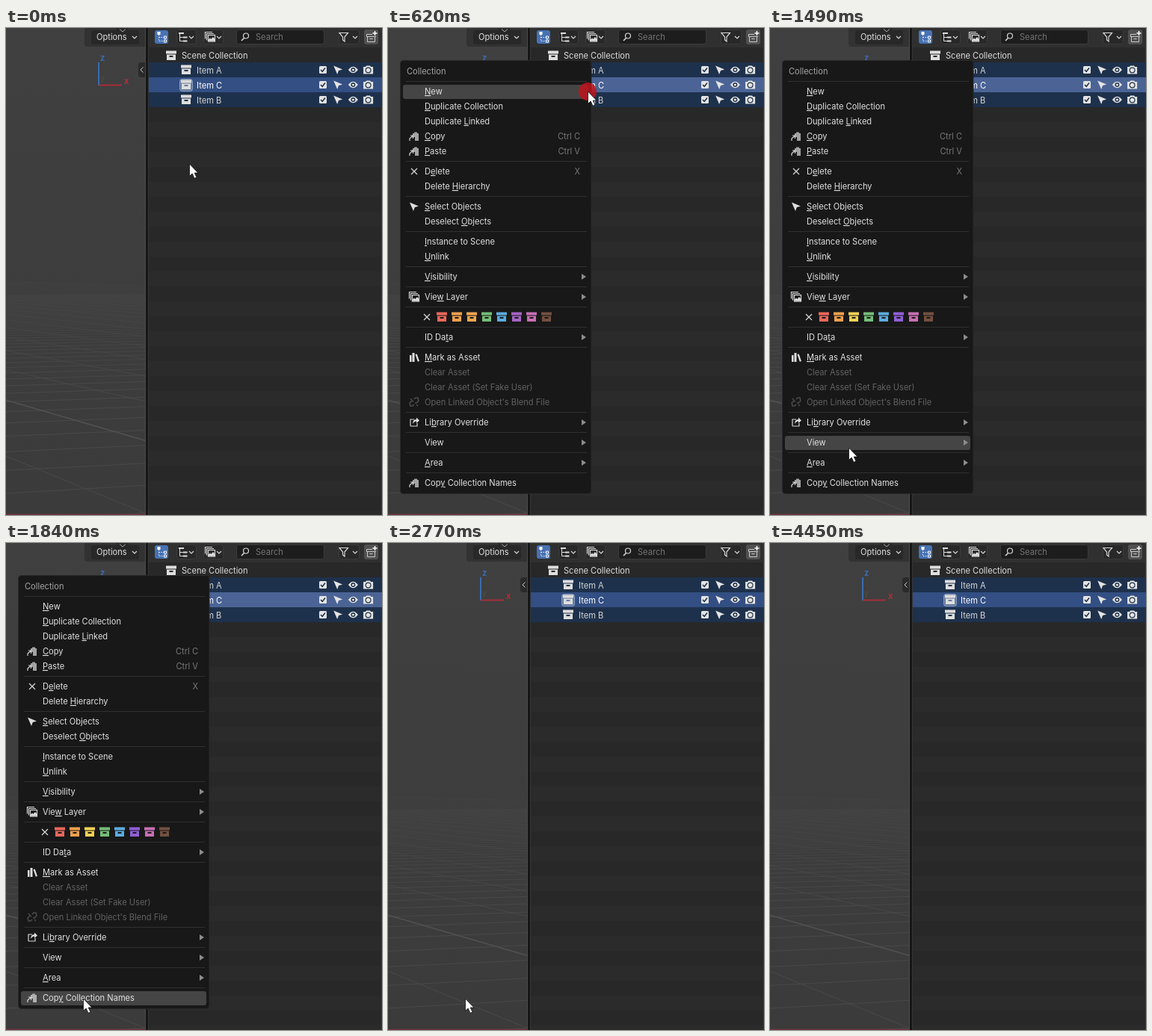
Recreate the animation shown at these times as an HTML page. Size 503 by 652 pixels, loop 5.18 s.

```html
<!DOCTYPE html>
<html lang="en">
<head>
<meta charset="utf-8">
<title>Copy collection names</title>
<style>
html, body { margin: 0; width: 100%; height: 100%; overflow: hidden; background: #161616; }
svg { display: block; width: 503px; height: 652px; }
text { font: 11.1px Inter, "Open Sans", sans-serif; fill: #dedede; white-space: pre; }
.bold { font-weight: 700; }
.u { text-decoration: underline; text-decoration-thickness: 1px; text-underline-offset: 2px; }
.line { fill: none; stroke: #d8d8d8; stroke-width: 1.2; }
.btn { fill: #282828; stroke: #3b3b3b; }
</style>
</head>
<body>
<svg id="stage" viewBox="0 0 503 652" xmlns="http://www.w3.org/2000/svg">
  <defs>
    <linearGradient id="sky" x2="0" y2="1">
      <stop offset="0" stop-color="#404040"/><stop offset="1" stop-color="#3b3b3b"/>
    </linearGradient>
    <linearGradient id="fade" gradientUnits="userSpaceOnUse" x1="0" y1="320" x2="0" y2="480">
      <stop offset="0" stop-color="#4b4b4b" stop-opacity="0"/><stop offset="1" stop-color="#4b4b4b" stop-opacity=".9"/>
    </linearGradient>
    <clipPath id="view"><rect width="186" height="652"/></clipPath>
    <g id="box"><path d="M-7-6.500h14v4h-14zM-6-1.500H6v7.500H-6zM-2.500 0v2h5v-2z" fill-rule="evenodd"/></g>
    <g id="arrow"><path d="M-6-5.500L6-.5 .8 1 -1 6z"/></g>
    <g id="eye">
      <path d="M-6.500 0Q0-8.500 6.500 0Q0 8.500-6.500 0z"/>
      <circle r="3" fill="#1d3048"/><circle r="1.600"/>
    </g>
    <g id="cam">
      <path d="M-6.500-4h3l1-1.500h5l1 1.500h3v9.500h-13z"/>
      <circle cy=".5" r="4" fill="#1d3048"/><circle cy=".5" r="2.800"/>
    </g>
    <g id="check">
      <rect x="-5" y="-5" width="10" height="10" rx="1.500"/>
      <path d="M-3 0L-.8 2.300 3-2.500" fill="none" stroke="#1d3048" stroke-width="1.500"/>
    </g>
    <g id="chev"><path d="M-3-1.500L0 1.500 3-1.500" class="line"/></g>
    <g id="image">
      <path d="M-6.500 2.500V-6.500H3M-4.500 4.500V-4.500H5" class="line" stroke-width="1"/>
      <rect x="-2.500" y="-2.500" width="9" height="8.500" class="line"/>
      <path d="M-2 5.500V3.500L0 1.500 1.500 3 4 0 6 2.500V5.500z"/>
    </g>
    <g id="clip">
      <path d="M-2-4H0V-5.500H4V-4H6V6H1V1H-2z" opacity=".7"/>
      <path d="M-6 6V3L-2-.5M-5-1H-1.500V3" class="line"/>
    </g>
    <g id="cross"><path d="M-4-4L4 4M4-4L-4 4" class="line"/></g>
    <g id="books"><path d="M-6-3h2.500v9H-6zM-2.500-6H.5V6h-3zM1.500-4l2.200-.6L7 5l-2.200.8z"/></g>
    <g id="chain" fill="none" stroke="#4c4c4c" stroke-width="1.500">
      <path d="M-1-1l-2-1-3 3 1 4 3 0 2-2M1 1l2 0 3-3-1-4-3 0-2 2M-5-5l2 2M5 5l-2-2"/>
    </g>
    <g id="over">
      <path d="M-5 5V-4H0M-5 5H4V1" class="line"/>
      <path d="M-2 2Q-2-4 3-4V-6.500L7-2.500 3 1V-1.500Q0-1.500-2 2z"/>
    </g>
  </defs>
  <g id="back"></g>
  <g id="menu">
    <rect x="16.500" y="43.500" width="255.500" height="580" rx="4" fill="#181818" stroke="#282828"/>
    <rect id="glow" x="20" width="248" height="19" rx="3" fill="#454545"/>
    <g id="items"></g>
  </g>
  <g id="tip">
    <rect x="74.500" y="628.500" width="351" height="32" rx="4" fill="#181818" stroke="#282828"/>
    <text x="84" y="645">Copy the names of the selected collections to the clipboard</text>
  </g>
  <circle id="dot" r="12"/>
  <path id="hand" d="M.5 0V16.300L4.200 13 7 19.300 10 18 7.200 12H12z" fill="#fff" stroke="#111" stroke-width=".8"/>
</svg>
<script>
const LOOP = 5180;
const $ = id => document.getElementById(id);
const rect = (x, y, w, h, fill, more = '') =>
  `<rect x="${x}" y="${y}" width="${w}" height="${h}" fill="${fill}" ${more}/>`;
const icon = (id, x, y, fill = '#dedede') => `<use href="#${id}" x="${x}" y="${y}" fill="${fill}"/>`;
const label = (x, y, s, fill = '#dedede', more = '') =>
  `<text x="${x}" y="${y + 4}" style="fill:${fill}" ${more}>${s}</text>`;
const path = (d, stroke, more = '') => `<path d="${d}" fill="none" stroke="${stroke}" ${more}/>`;
const button = (x, w) => `<rect x="${x + .5}" y="2.500" width="${w}" height="19" rx="3" class="btn"/>`;

function viewport() {
  const horizon = 317;
  let lines = '';
  for (let k = 0; k < 28; k++) {
    const y = horizon + 625 / (2.44 + k);
    lines += `M-625 ${horizon}L186 ${y + (y - horizon) * 186 / 625}`;
  }
  for (let k = -1; k < 60; k++) {
    const y = horizon + 306 * 9 / (9 + k);
    lines += `M0 ${y}L186 ${y - (y - horizon) * .035}`;
  }
  return rect(0, 0, 186, 652, 'url(#sky)')
    + '<g clip-path="url(#view)">' + path(lines, 'url(#fade)', 'stroke-width=".9"')
    + path('M0 498L186 552', '#565656')
    + '<path d="M105 0V21Q105 25 109 25H186V0z" fill="#323232"/>'
    + rect(114, 3, 64, 19, '#282828', 'rx="3"') + label(121, 12, 'Options', '#e2e2e2') + icon('chev', 172, 12.5)
    + '<path d="M147 0H164L161 6H150z" fill="#282828"/>' + path('M152 1.500L156 5 160 1.500', '#aaa')
    + path('M124 77V46', '#3a6cb0', 'stroke-width="2"') + path('M124 76.500H155', '#a82c38', 'stroke-width="2"')
    + label(126, 40, 'z', '#3a6cb0', 'class="bold"') + label(126, 67, 'y', '#4b5040')
    + label(158, 71, 'x', '#b52c3a', 'class="bold"')
    + '<path d="M187 46H181Q177 46 177 50V62Q177 66 181 66H187z" fill="#2a2a2a"/>' + path('M183.500 52.500L180 56 183.500 59.500', '#ccc')
    + rect(0, 650.5, 186, 1.5, '#6e3440') + '</g>'
    + rect(186, 0, 1, 652, '#4a4a4a') + rect(187, 0, 3, 652, '#161616') + rect(190, 0, 1, 652, '#363636');
}

function header() {
  return rect(191, 0, 312, 26, '#303030')
    + rect(199, 3, 18, 18, '#4772b3', 'rx="3"')
    + path('M204.500 9V17.500H211M204.500 12.500H211', '#e8e8e8', 'stroke-dasharray="1.500 1.500"')
    + rect(202.5, 5, 4, 4, '#fff') + path('M211.500 11H214.500V14H211.500zM211.500 16H214.500V19H211.500z', '#fff')
    + button(228, 26) + path('M232.500 8V17.500H237M232.500 12.500H237', '#ddd')
    + rect(231, 6, 7, 2, '#ddd') + rect(237, 11.5, 5.5, 2, '#ddd') + rect(237, 16.5, 5.5, 2, '#ddd') + icon('chev', 248, 12.5)
    + button(264, 26) + icon('image', 273, 12) + icon('chev', 285, 12.5)
    + rect(308.5, 2.5, 117, 19, '#1d1d1d', 'rx="3" stroke="#3b3b3b"')
    + '<circle cx="321" cy="10.500" r="3.500" class="line"/>' + path('M318.500 13.500L315 17', '#d8d8d8', 'stroke-width="1.600"')
    + label(334, 12, 'Search', '#747474')
    + button(445, 27) + '<path d="M446 6.500H457.500L453 12V18L450.500 16V12z" class="line"/>' + icon('chev', 467, 12.5)
    + rect(479, 2, 19, 20, '#505050', 'rx="3"')
    + path('M490 8.500H482.500V11.500H495M483.500 11.500V18.500H493.500V11.500M486.500 14.500H490.500', '#c8c8c8')
    + path('M493.500 4V10M490.500 7H496.500', '#fff', 'stroke-width="1.500"');
}

function outliner() {
  let s = rect(191, 26, 312, 626, '#282828');
  for (let y = 46; y < 652; y += 40) s += rect(191, y, 312, 20, '#2b2b2b');
  s += rect(502, 26, 1, 626, '#363636');
  s += icon('box', 221, 37) + label(235, 37, 'Scene Collection');
  ['A', 'C', 'B'].forEach((name, i) => {
    const y = 56 + i * 20, on = name === 'C';
    s += rect(191, y - 10, 312, 20, on ? '#334f83' : '#1e314c', on ? 'id="active"' : '');
    if (on) s += rect(232.5, 68.5, 17, 16, '#fff', 'rx="3" fill-opacity=".25" stroke="#fff" stroke-opacity=".35"');
    s += icon('box', 241, y) + label(255, y + 1, 'Item ' + name, on ? '#fff' : '#d6d6d6');
    ['check', 'arrow', 'eye', 'cam'].forEach((id, k) => s += icon(id, 424 + k * 20.2, y, '#e4e4e4'));
  });
  return s;
}

// [y, text with _ before the shortcut letter, icon, right-hand side]
const ITEMS = [
  [85, '_New'], [105, '_Duplicate Collection'], [125, 'Duplicate _Linked'],
  [145, '_Copy', 'clip', 'Ctrl C'], [165, '_Paste', 'clip', 'Ctrl V'],
  [192, 'D_elete', 'cross', 'X'], [212, 'Delete _Hierarchy'],
  [239, '_Select Objects', 'arrow'], [259, 'Deselect _Objects'],
  [286, '_Instance to Scene'], [306, '_Unlink'],
  [333, '_Visibility', '', '>'], [360, 'Vie_w Layer', 'image', '>'],
  [414, 'ID Da_ta', '', '>'], [441, '_Mark as Asset', 'books'],
  [461, 'Clear Asset'], [481, 'Clear Asset (Set Fake User)'],
  [501, "Open Linked Object's Blend File", 'chain'],
  [528, 'Li_brary Override', 'over', '>'], [555, 'View', '', '>'],
  [582, '_Area', '', '>'], [609, 'Cop_y Collection Names', 'clip']
];
const RULES = [71, 178, 225, 272, 319, 346, 373, 400, 427, 514, 541, 568, 595];
const TAGS = ['#e9685c', '#f0a04e', '#f5d255', '#74bd78', '#5cace0', '#8f5fd8', '#c86fb4', '#735040'];

function menuItems() {
  let s = label(25, 58, 'Collection', '#a4a4a4');
  for (const y of RULES) s += rect(24, y, 242, 1, '#303030');
  for (const [y, text, pic, side] of ITEMS) {
    const off = y > 450 && y < 510;
    s += label(49, y, text.replace(/_(.)/, '<tspan class="u">$1</tspan>'), off ? '#626262' : '#e2e2e2');
    if (pic) s += icon(pic, 35, y);
    if (side === '>') s += `<path d="M259 ${y - 4}L265 ${y} 259 ${y + 4}z" fill="#8c8c8c"/>`;
    else if (side) s += label(257, y, side, '#777', 'text-anchor="end"');
  }
  s += icon('cross', 52, 387);
  TAGS.forEach((c, i) => s += `<use id="tag${i}" href="#box" x="${72 + i * 20}" y="387" fill="${c}"/>`);
  return s;
}

// [time, pointer x, pointer y, lit menu row]
const MOVES = [
  [0, 245, 182], [70, 246, 177], [140, 250, 157], [210, 257, 124], [280, 263, 100],
  [350, 266, 89], [420, 267, 85], [620, 267, 85, 85],
  [1090, 256, 118, 105], [1160, 214, 234, 212], [1220, 163, 359, 333], [1290, 137, 440, 414],
  [1360, 118, 497, 441], [1420, 109, 535, 528], [1490, 105, 562, 555], [1560, 104, 578, 582],
  [1630, 103, 583, 582], [1700, 103, 592, 582], [1770, 103, 602, 609], [1840, 103, 610, 609],
  [4310, 82, 605], [4380, 19, 590], [4450, -40, 575]
];

const show = (id, on) => $(id).setAttribute('visibility', on ? 'visible' : 'hidden');

function draw(t) {
  const within = (a, b) => t >= a && t < b;
  const [, x, y, row] = MOVES.findLast(m => m[0] <= t);
  $('hand').setAttribute('transform', `translate(${x} ${y})`);
  show('menu', within(620, 2770));
  show('glow', row && within(620, 2770));
  if (row) $('glow').setAttribute('y', row - 9);
  show('tip', within(2370, 2640));
  $('active').setAttribute('fill', within(420, 2770) ? '#4b6495' : '#334f83');
  const late = t >= 1290;
  $('tag2').setAttribute('fill', late ? TAGS[2] : '#f0a650');
  $('tag5').setAttribute('fill', late ? TAGS[5] : '#a565c4');
  const red = within(620, 820);
  show('dot', red || within(2640, 2770));
  $('dot').setAttribute('fill', red ? 'rgba(190,20,28,.85)' : 'rgba(215,200,20,.75)');
  $('dot').setAttribute('cx', x);
  $('dot').setAttribute('cy', red ? y : y - 1);
}

$('back').innerHTML = viewport() + outliner() + header();
$('items').innerHTML = menuItems();

const start = performance.now();
function tick() {
  draw((performance.now() - start) % LOOP);
  requestAnimationFrame(tick);
}
draw(0);
requestAnimationFrame(tick);
</script>
</body>
</html>
```
